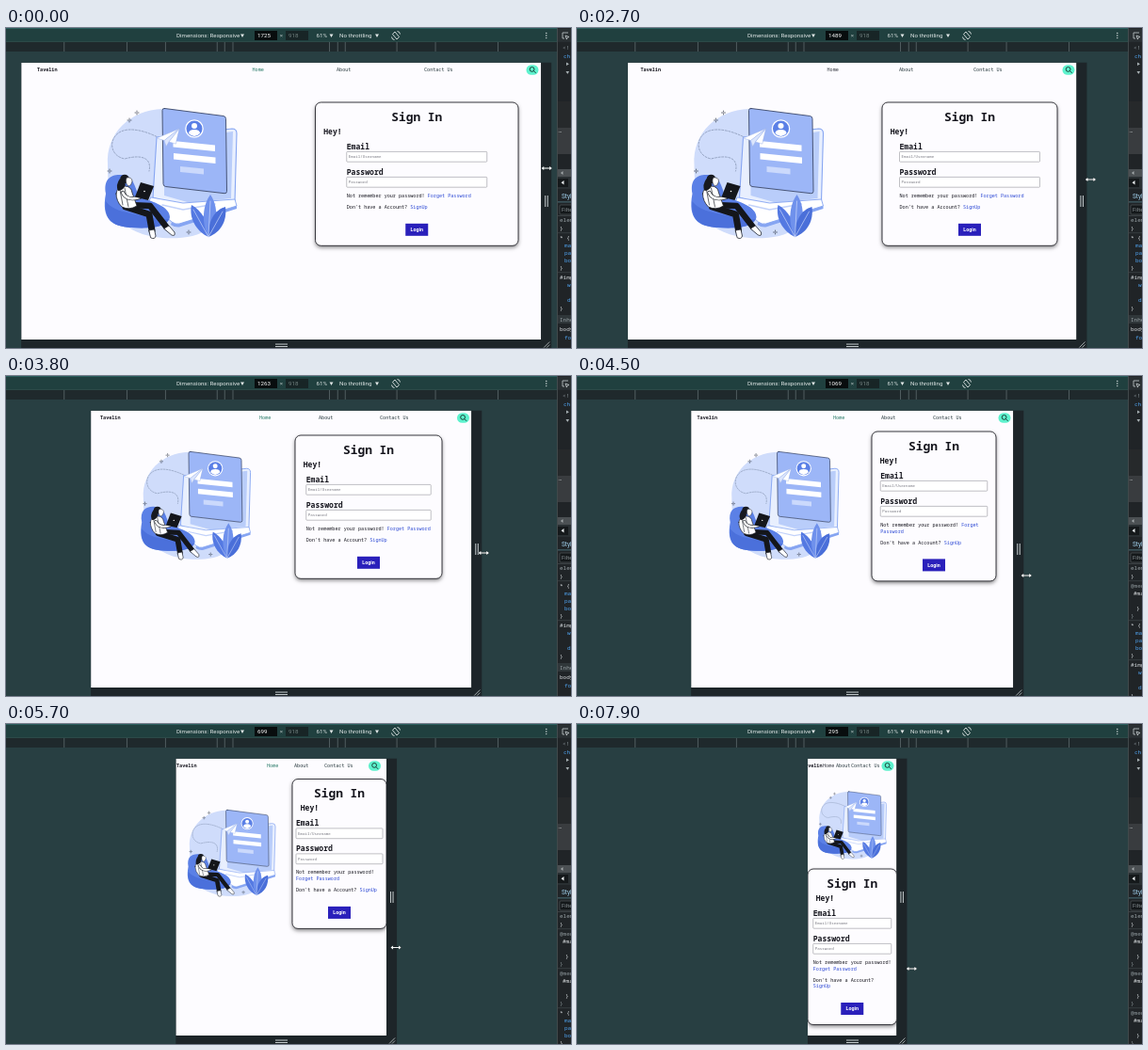
Recreate the animation shown at these times as an HTML page with a canvas. Size 600 px wide and 340 px high, loop 8 s.

```html
<!DOCTYPE html>
<html lang="en">
<head>
<meta charset="utf-8">
<title>Responsive sign-in page</title>
<style>
html, body { margin: 0; width: 100%; height: 100%; overflow: hidden; background: #283f42; }
canvas { display: block; width: 600px; height: 340px; }
</style>
</head>
<body>
<canvas id="stage"></canvas>
<script>
const canvas = document.getElementById('stage');
const ctx = canvas.getContext('2d');
const dpr = window.devicePixelRatio || 1;
canvas.width = 600 * dpr;
canvas.height = 340 * dpr;

const LOOP = 8000, STEP = 100;
const MID_X = 292.2, ZOOM = 0.32;
const PAGE_TOP = 36.7, PAGE_BOTTOM = 331;
const MONO = '"Noto Sans Mono", "DejaVu Sans Mono", monospace';
const SANS = 'Roboto, "Open Sans", sans-serif';
const INK = '#15151d', LINK = '#2b48d4', BLUE = '#5b80e6';
const CHAR = 3.07, LINE = 6.6;

// time -> viewport width
const WIDTH = [[0, 1725], [1000, 1725], [1400, 1730], [1800, 1725], [1900, 1702], [2700, 1489],
  [3600, 1313], [3800, 1263], [4500, 1069], [5700, 699], [6300, 476], [7200, 357], [7900, 295]];
// time -> pointer distance from the page edge, pointer y
const POINTER = [[0, 6, 149], [900, 6.5, 148], [1900, 11.5, 147], [2700, 15, 161], [3800, 13, 188],
  [4500, 14, 212], [5700, 10, 237.5], [7900, 16, 260]];
// width -> brand, three links, search
const NAV = [[295, 239, 261, 275, 291, 330], [699, 181, 277, 306, 338, 391.5],
  [1069, 127.5, 272, 323, 378, 454], [1263, 100, 269, 332, 397, 485.5],
  [1489, 67.5, 265.5, 342, 421, 522], [1725, 33, 261.5, 351, 444, 559]];
// width -> card x, card width, field width, card y, art x, art y, art scale
const WIDE = [[1489, 324, 186, 149, 79, 182.5, 85, 1], [1702, 327, 213, 149, 79, 167, 85, 1],
  [1725, 328.5, 215.5, 149, 79, 166, 85, 1]];
const MEDIUM = [[699, 304, 100, 92, 58.5, 233.5, 91, .665], [1069, 313, 132, 113.5, 59, 212.5, 80, .83],
  [1263, 307, 156, 132.5, 63, 194, 80, .83]];
const NARROW = [[295, 245, 94.5, 83, 154, 287.5, 71.5, .52], [600, 237, 110, 92, 182, 286, 71.5, .7]];

function sample(keys, at) {
  let i = 0;
  while (i < keys.length - 2 && at >= keys[i + 1][0]) i++;
  const a = keys[i], b = keys[i + 1], k = (at - a[0]) / (b[0] - a[0]);
  return a.slice(1).map((v, j) => v + (b[j + 1] - v) * k);
}

function rect(x, y, w, h, fill) {
  ctx.fillStyle = fill;
  ctx.fillRect(x, y, w, h);
}

function text(str, x, y, font, color, align = 'left') {
  ctx.font = font;
  ctx.fillStyle = color;
  ctx.textAlign = align;
  ctx.textBaseline = 'middle';
  ctx.fillText(str, x, y);
}

function shape(d, fill, stroke, width = 1) {
  const p = new Path2D(d);
  if (fill) { ctx.fillStyle = fill; ctx.fill(p); }
  if (stroke) { ctx.strokeStyle = stroke; ctx.lineWidth = width; ctx.stroke(p); }
}

function disc(x, y, r, fill) {
  ctx.beginPath();
  ctx.arc(x, y, r, 0, 7);
  ctx.fillStyle = fill;
  ctx.fill();
}

function box(x, y, w, h, r, fill) {
  ctx.beginPath();
  ctx.roundRect(x, y, w, h, r);
  ctx.fillStyle = fill;
  ctx.fill();
}

function outline(color, width) {
  ctx.strokeStyle = color;
  ctx.lineWidth = width;
  ctx.stroke();
}

function caret(x, y) {
  shape(`M${x - 2} ${y - 1.6}h4l-2 3.4z`, '#e2e8e8');
}

function toolbar(w) {
  const light = '#e2e8e8', font = '6.2px ' + SANS;
  rect(0, 0, 585, 15, '#20403f');
  rect(0, 0, 600, .8, '#2f6664');
  rect(0, 15, 585, 10, '#1f292c');
  rect(0, 14.4, 585, .6, '#35514f');
  for (const size of [320, 375, 425, 768, 1024, 1440])
    for (const side of [-1, 1])
      rect(MID_X + side * size * ZOOM / 2 - .4, 15, .8, 10, '#5d6a6d');
  text('Dimensions: Responsive', 181, 8.3, font, light);
  caret(251, 8.2);
  rect(264, 3, 24, 10, '#080d0e');
  text(Math.round(w), 267, 8.3, font, '#ffffff');
  text('×', 292.5, 8.3, font, '#b4c0c0', 'center');
  rect(297, 3, 24, 10, '#182526');
  text('918', 300, 8.3, font, '#71807f');
  text('61%', 329.5, 8.3, font, light);
  caret(345.5, 8.2);
  text('No throttling', 354, 8.3, font, light);
  caret(394, 8.2);
  shape('M410.500 6.500l2.500-2.500l4.500 5.500l-2.500 2.500zM409.500 9.500q.5 3 3 3M418.500 6.500q-.5-3-3-3', null, light, .9);
  for (const y of [5.4, 8, 10.6]) disc(573.8, y, .7, light);
}

function devPanel(w) {
  const font = '6px ' + MONO, prop = '#4fa3f0';
  const line = (s, y, color = '#d8dde0', x = 588) => text(s, x, y, font, color);
  ctx.save();
  ctx.beginPath();
  ctx.rect(585, 0, 15, 340);
  ctx.clip();
  rect(585, 0, 15, 340, '#202427');
  rect(585, .8, 15, 14, '#2a3033');
  rect(585, 0, .8, 340, '#4a5356');
  shape('M591 5h6M591 5v6h2M594 8l4 1.5l-2 .6l-.6 2z', null, '#c4cccf', .8);
  line('<!', 21, '#8a9498', 591);
  line('ch', 30, prop, 592);
  shape('M595 36.4l3 1.8l-3 1.8z', '#a8b1b4');
  shape('M594.500 46h3.600l-1.800 3z', '#a8b1b4');
  rect(586, 78, 14, 28, '#26292b');
  rect(586, 106, 14, 28, '#393c3f');
  line('…', 109, '#cfd5d7', 586.5);
  rect(586, 150, 14, 8, '#4b5053');
  shape('M591.500 152l-2.500 2l2.500 2z', '#a2a8aa');
  rect(586, 158, 14, 13, '#292f32');
  rect(586, 160, 11, 9, '#15191b');
  shape('M592.500 162l-3 2.200l3 2.200z', '#e6eaeb');
  text('Styles', 590, 179, '6.5px ' + SANS, '#a3d4f2');
  rect(586, 184.5, 14, .8, '#54808c');
  box(588, 188, 18, 10, 1, '#14181a');
  outline('#596063', .6);
  text('Filter', 590, 193.2, '6px ' + SANS, '#8b9497');
  rect(586, 199, 14, .7, '#454c50');
  line('element', 204.5, '#9ba4a8');
  line('}', 213);

  const blocks = w > 1200 ? 0 : w > 768 ? 1 : w > 600 ? 2 : 3;
  let y = 223;
  const divider = () => rect(586, y - 5.5, 14, .6, '#454c50');
  for (let i = 0; i < blocks; i++, y += 42) {
    divider();
    line('@media', y, '#8d979b');
    line('#main', y + 8.5, '#e3e7e9', 591);
    line('}', y + 24.5, '#d8dde0', 594);
    line('}', y + 32, '#8d979b');
  }
  divider();
  line('* {', y);
  ['margin', 'padding', 'box'].forEach((s, i) => line(s, y + 8 + i * 8, prop, 593));
  line('}', y + 32);
  y += 42;
  divider();
  line('#img', y);
  line('w', y + 8, prop, 596);
  line('d', y + 24, prop, 596);
  line('}', y + 33);
  y += 45;
  rect(586, y - 5, 14, 9, '#30373a');
  line('Inherited', y, '#98a2a6');
  line('body', y + 10);
  line('font', y + 19, prop, 593);
  ctx.restore();
}

function sparkle(x, y) {
  shape(`M${x} ${y - 2}v1.2M${x} ${y + .8}v1.2M${x - 2} ${y}h1.2M${x + .8} ${y}h1.2`, null, '#3a4150', .7);
}

function art(x, y, s) {
  ctx.save();
  ctx.translate(x, y);
  ctx.scale(s, s);
  ctx.translate(-166, -85);
  ctx.lineJoin = ctx.lineCap = 'round';
  shape('M108 145C106 112 132 87 166 86C205 84 238 110 241 150C243 188 226 214 198 221C170 227 132 222 118 200C110 186 108 165 108 145z', '#cfdcfb');

  ctx.setLineDash([2, 1.6]);
  shape('M163 117C150 110 133 105 122 110C108 117 110 136 126 139C144 134 155 138 152 152', null, '#6f7f9d', .6);
  ctx.setLineDash([]);

  // laptop
  shape('M160 116L240 107Q245 107 245 112L243 184L190 191L156 180z', '#e8effe', '#86a5f2', 1.1);
  shape('M234 111L241 110L239 181L196 186L168 178V168L234 176z', '#b9cdfa');
  shape('M154 180L188 186L243 182L245 189L184 208Q180 209 176 206L152 185z', '#ffffff', '#86a5f2', .9);
  shape('M176 206Q180 209 184 208L245 189V192L184 211.500Q179 212 175 209z', '#86a5f2');
  shape('M166 188L188 193L222 187', null, '#c2d2fa', 1.4);

  // floating form
  shape('M168.500 85.500L231 93.500Q233.500 94 233.500 96.500L234.500 173.500Q234.500 176 232 175.700L169.500 168.500Q167 168 167 165.500L166 87.500Q166 85 168.500 85.500z', '#9cb6f7', '#3c4868', .9);
  disc(200, 107, 9.8, '#ffffff');
  disc(200, 107, 8.5, BLUE);
  disc(200, 104, 3, '#ffffff');
  shape('M194 112Q194 108 200 108Q206 108 206 112Q203 115 200 115Q197 115 194 112z', '#ffffff');
  shape('M177.500 120L222 124.500V131L177.500 126.500z', '#ffffff');
  shape('M178 133L222.500 137.500V144L178 139.500z', '#ffffff');
  shape('M185 147L210 149.500V155.500L185 153z', '#cbd9fc');

  shape('M184 107L160 117L168 119.500z', '#ffffff', '#9fb5ea', .5);
  shape('M184 107L168 119.500L170 126L173 121z', '#dce6fd', '#9fb5ea', .5);
  shape('M184 107L173 121L180 123z', '#ffffff', '#9fb5ea', .5);

  // bean bag
  shape('M106 176C103 160 112 155 123 156C137 157 137 172 142 180C156 184 174 190 174 201C172 213 148 213 133 212C112 211 101 203 106 176z', BLUE);
  shape('M106 184C114 195 130 196 142 199C154 202 166 204 173 203C169 213 148 213 133 212C112 211 104 202 106 184z', '#4b70db');

  // leaves
  shape('M215 222C202 216 194 202 197 188C208 194 216 207 215 222z', '#5479e2');
  shape('M215 222C207 207 209 188 217 177C226 190 225 209 215 222z', '#6f91ec');
  shape('M215 222C214 205 222 193 233 190C235 205 228 217 215 222z', '#4a6fd9');
  shape('M215 222L199 193M215 222L217 184M215 222L230 195', null, '#dbe5fd', .6);

  // reader: legs, shirt, head, arm, notebook
  shape('M127 190L152 198L155 215', null, '#14161b', 7);
  shape('M131 188L153 189L170 211', null, '#14161b', 6.5);
  shape('M117 176Q118 168 126 168Q133 168 134 175L139 189Q131 194 123 190Q117 184 117 176z', '#ffffff', '#20242c', .8);
  shape('M121 172L124 188M126 170L130 190', null, '#20242c', .7);
  disc(126, 160.5, 4.8, '#17191f');
  shape('M121 160Q116 167 119 173Q125 173 127 166z', '#17191f');
  shape('M128 159Q134 158 134 163Q133 168 130 168Q126 165 128 159z', '#ffffff', '#20242c', .6);
  shape('M124 175Q128 184 142 180', null, '#20242c', 4.2);
  shape('M124 175Q128 184 142 180', null, '#ffffff', 2.8);
  shape('M143 164L157 168L151 183L137 179.500z', '#14161b');
  disc(147, 173.5, .8, '#ffffff');
  shape('M168 213L173 210L179 217Q180 222 176 220z', '#ffffff', '#20242c', .8);
  shape('M152 215L157.500 214L159 221Q158 225 154 223z', '#ffffff', '#20242c', .8);

  sparkle(131, 98);
  sparkle(139, 90);
  sparkle(110, 152);
  sparkle(194, 217);
  ctx.restore();
}

// Draws coloured words, wrapping at max; returns the y of the last line.
function flow(parts, x, y, max) {
  let col = 0;
  for (const [str, color] of parts)
    for (const word of str.split(' ')) {
      if (col && (col + word.length) * CHAR > max + .5) { col = 0; y += LINE; }
      text(word, x + col * CHAR, y, '5.12px ' + MONO, color);
      col += word.length + 1;
    }
  return y;
}

function field(label, hint, x, y, w) {
  text(label, x, y, '600 8.1px ' + MONO, INK);
  box(x, y + 5.2, w, 10.8, .8, '#ffffff');
  outline('#96969d', .6);
  text(hint, x + 2, y + 10.8, '4.15px ' + MONO, '#777780');
}

function card(x, y, w, fw) {
  const mid = x + w / 2, fx = mid - fw / 2;
  const wraps = [43, 28].filter(n => n * CHAR > fw + .5).length;
  const extra = wraps * LINE;
  ctx.save();
  ctx.shadowColor = 'rgba(0,0,0,.5)';
  ctx.shadowBlur = 4 * dpr;
  ctx.shadowOffsetY = 2 * dpr;
  box(x, y, w, 152.3 + extra, 6, '#fdfcff');
  ctx.restore();
  outline('#24242b', .9);

  text('Sign In', mid, y + 16, 'bold 12.85px ' + MONO, INK, 'center');
  text('Hey!', x + 8.8, y + 31.3, 'bold 8px ' + MONO, INK);
  field('Email', 'Email/Username', fx, y + 47.2, fw);
  field('Password', 'Password', fx, y + 74.2, fw);
  const end = flow([['Not remember your password!', INK], ['Forget Password', LINK]], fx, y + 99.5, fw);
  flow([["Don't have a Account?", INK], ['SignUp', LINK]], fx, end + 12, fw);
  const by = y + 128.8 + extra;
  rect(mid - 12, by, 24, 13, '#2a20bb');
  text('Login', mid, by + 6.8, 'bold 5.4px ' + SANS, '#ffffff', 'center');
}

function page(w, t) {
  const left = MID_X - w * ZOOM / 2, right = MID_X + w * ZOOM / 2;
  rect(left, PAGE_TOP, right - left + 11, 340 - PAGE_TOP, '#1d2529');
  ctx.save();
  ctx.beginPath();
  ctx.rect(left, PAGE_TOP, right - left, PAGE_BOTTOM - PAGE_TOP);
  ctx.clip();
  rect(left, PAGE_TOP, right - left, PAGE_BOTTOM - PAGE_TOP, '#fdfcff');

  const [brand, home, about, contact, search] = sample(NAV, w);
  const font = '5.12px ' + MONO;
  const greenHome = t < 1000 || (t >= 3700 && t < 6300);
  text('Tavelin', brand, 44.7, 'bold ' + font, INK);
  text('Home', home, 44.7, font, greenHome ? '#1f7461' : '#2c3038');
  text('About', about, 44.7, font, '#24363a');
  text('Contact Us', contact, 44.7, font, '#24363a');
  box(search - 6.5, 39.2, 13, 10.6, 5.3, '#5df2cd');
  shape(`M${search + 1.4} 45.600l2.300 2.300`, null, '#15302b', .9);
  ctx.beginPath();
  ctx.arc(search - .4, 43.9, 2.4, 0, 7);
  ctx.stroke();

  const keys = w > 1400 ? WIDE : w > 600 ? MEDIUM : NARROW;
  const [cx, cw, fw, cy, ax, ay, as] = sample(keys, w);
  art(ax, ay, as);
  card(cx, cy, cw, fw);
  ctx.restore();

  // resize grips
  const grip = '#c6cdcf';
  rect(right + 4, 178, 1, 12, grip);
  rect(right + 6.5, 178, 1, 12, grip);
  rect(286, 335.5, 13, 1, grip);
  rect(286, 338, 13, 1, grip);
  shape(`M${right + 3} 339.500l6-6M${right + 6} 339.500l3-3`, null, grip, .8);
  return right;
}

function pointer(x, y) {
  const d = `M${x - 5.5} ${y}l2.500-2v1.500h6v-1.500l2.500 2l-2.500 2v-1.500h-6v1.500z`;
  shape(d, '#f4f7f7', '#182225', .8);
  shape(d, '#f4f7f7');
}

function draw(t) {
  ctx.setTransform(dpr, 0, 0, dpr, 0, 0);
  rect(0, 0, 600, 340, '#283f42');
  const [w] = sample(WIDTH, t);
  toolbar(w);
  const right = page(w, t);
  devPanel(w);
  const [gap, y] = sample(POINTER, t);
  pointer(right + gap, y);
}

function tick(now) {
  draw(Math.floor(now % LOOP / STEP) * STEP);
  requestAnimationFrame(tick);
}
draw(0);
requestAnimationFrame(tick);
</script>
</body>
</html>
```
